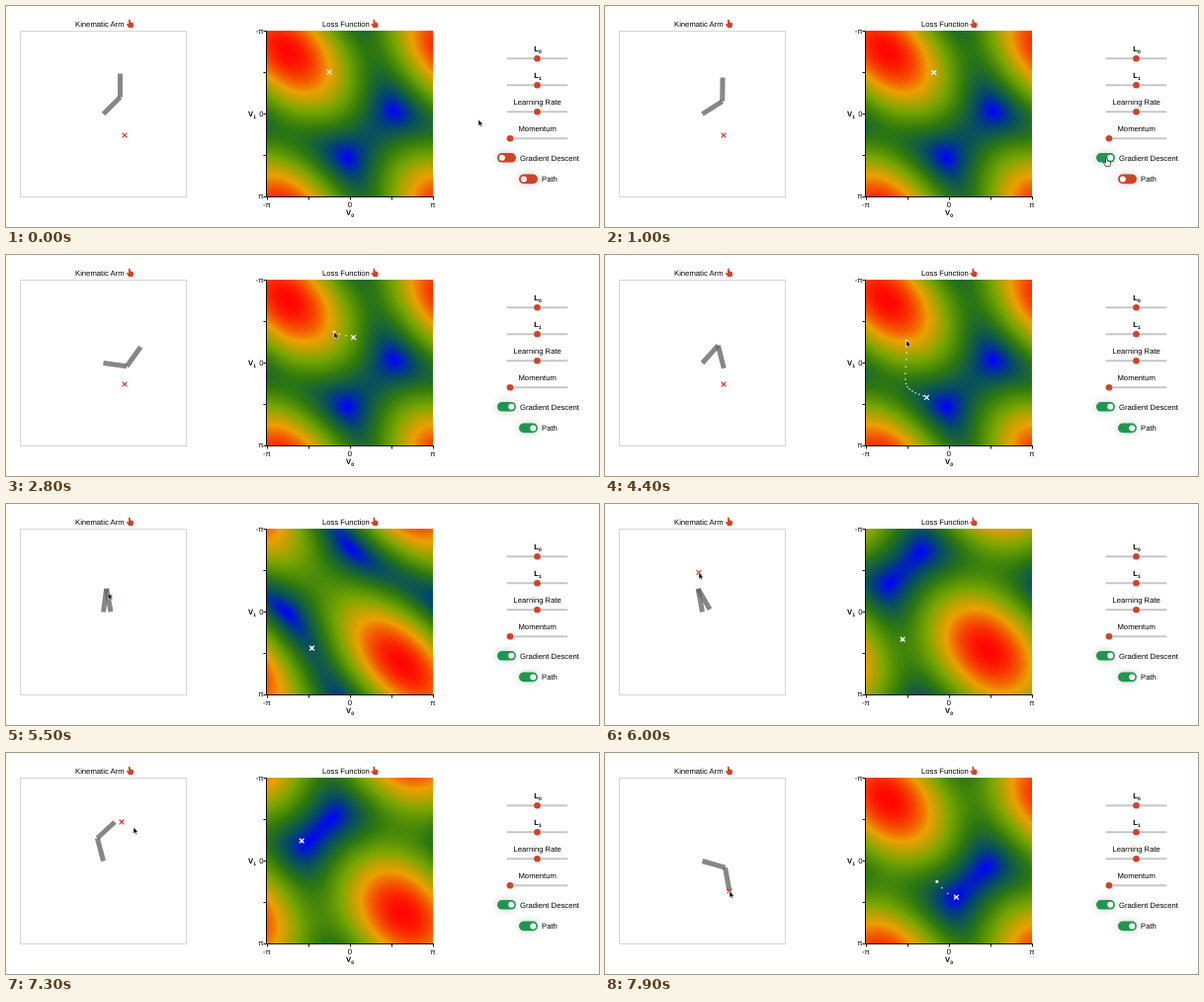
An HTML page with a canvas for the animation above (8000 ms loop, 600 px wide and 224 px high).

```html
<!DOCTYPE html>
<html lang="en">
<head>
<meta charset="utf-8">
<title>Kinematic Arm</title>
<style>
  html, body { margin: 0; width: 100%; height: 100%; overflow: hidden; background: #fff; }
  canvas { position: absolute; left: 264px; top: 25px; }
  svg { position: absolute; left: 0; top: 0; }
  text { font: 7.7px "Liberation Sans", Arial, sans-serif; text-rendering: geometricPrecision; }
  .b { font-weight: bold; }
  .mid { text-anchor: middle; }
  .end { text-anchor: end; }
  .pill { filter: drop-shadow(0 0 4px #0003); }
</style>
</head>
<body>
<canvas id="map" width="168" height="168"></canvas>
<svg width="600" height="224" viewBox="0 0 600 224">
  <defs>
    <path id="hand" d="M2.2 8.6 0 5.2Q-.4 4.2.8 4.3L2 5.2V.9Q2.2 0 2.9 0t.9.9V3Q4.7 2.5 5 3.3 5.9 2.9 6.1 3.7 7 3.5 7 4.5V6.3L6.2 8.6Z"/>
    <path id="x" d="M-2.4-2.4 2.4 2.4M2.4-2.4-2.4 2.4" fill="none" stroke-width="1.2"/>
  </defs>

  <text x="70" y="21">Kinematic Arm</text>
  <text x="320" y="21">Loss Function</text>
  <g fill="#cf4327">
    <use href="#hand" x="122" y="13.5"/>
    <use href="#hand" x="369.5" y="13.5"/>
  </g>
  <rect x="14.5" y="25.5" width="168" height="168" fill="none" stroke="#d6d6d6"/>

  <path id="axes" fill="none" stroke="#111"/>
  <g id="labels"></g>
  <text class="b mid" x="249" y="112">V<tspan font-size="5" dy="1.5">1</tspan></text>
  <text class="b mid" x="348" y="212">V<tspan font-size="5" dy="1.5">0</tspan></text>

  <g id="sliders"></g>
  <text class="b mid" x="538" y="46">L<tspan font-size="5" dy="1.5">0</tspan></text>
  <text class="b mid" x="538" y="73">L<tspan font-size="5" dy="1.5">1</tspan></text>
  <text class="mid" x="537.7" y="100">Learning Rate</text>
  <text class="mid" x="537.7" y="127">Momentum</text>
  <g id="descent" transform="translate(497 149)"></g>
  <g id="trace" transform="translate(519 170.6)"></g>
  <text x="520" y="157">Gradient Descent</text>
  <text x="542" y="178">Path</text>

  <path id="link0" stroke="#666" stroke-width="5" opacity=".78"/>
  <path id="link1" stroke="#666" stroke-width="5" opacity=".78"/>
  <use id="goal" href="#x" stroke="#e2301c"/>
  <g id="dots" fill="#fff"></g>
  <use id="mark" href="#x" stroke="#fff"/>
  <path id="arrow" d="M0 0V6.6L1.5 5.3 2.5 7.6 3.6 7.1 2.6 4.9H4.6Z" stroke="#fff" stroke-width=".5"/>
  <use id="pointer" href="#hand" fill="#fff" stroke="#222" stroke-width=".8"/>
</svg>
<script>
const $ = id => document.getElementById(id);
const { sin, cos, hypot, min, max, floor, PI } = Math;
const LOOP = 8000, FRAME = 100, SIZE = 168, LINK = 24, BASE = [98.5, 109.5], PLOT = [348, 109];
const DESCENT_ON = 940, PATH_ON = 1700;
const RATE = .0045, DOT_GAP = 60, LEAD = 80, MOVE = 350;

// The mark is put down twice, the goal is dragged twice along a curve.
const drops = [
  { time: 0, at: [327, 67] }, { time: 2610, at: [332, 78] }, { time: 3575, at: [305, 87] }
];
const drags = [
  { start: 4750, end: 6000, curve: [[120, 131], [107.5, 100], [95, 69.5]] },
  { start: 7200, end: 7700, curve: [[95, 69.5], [160, 62], [126, 140]] }
];
const stops = [
  { time: 0, at: [478, 115] }, { time: 900, at: [507, 154] }, { time: 1600, at: [528, 177] },
  { time: 2600, at: [332, 78] }, { time: 3560, at: [305, 86.5] }, { time: 4750, at: [120, 131] }
];
const ramp = [[0, 0, 255], [5, 75, 100], [45, 120, 15], [120, 165, 0], [235, 160, 0], [255, 5, 0]];

const clamp = u => min(1, max(0, u));
const smooth = u => u * u * (3 - 2 * u);
const mix = (a, b, u) => a.map((v, k) => v + (b[k] - v) * u);
const place = (el, [x, y]) => el.setAttribute("transform", `translate(${x} ${y})`);
const show = (el, on) => { el.style.display = on ? "" : "none"; };
const toAngles = p => p.map((v, k) => (v - PLOT[k]) / SIZE * 2 * PI);
const toPixels = a => a.map((v, k) => PLOT[k] + v * SIZE / 2 / PI);
const toReach = p => p.map((v, k) => (v - BASE[k]) / LINK);

function goalAt(t) {
  const { start, end, curve: [a, b, c] } = t < drags[1].start ? drags[0] : drags[1];
  const u = clamp((t - start) / (end - start));
  return mix(mix(a, b, u), mix(b, c, u), u);
}

function cursorAt(t) {
  if (t >= drags[0].start) return goalAt(t + (t < drags[1].start ? min(LEAD, max(0, drags[0].end - t)) : LEAD));
  return stops.reduce((p, s) => mix(p, s.at, smooth(clamp((t - s.time + MOVE) / MOVE))), stops[0].at);
}

// Descent on the distance between the arm's tip and the goal, one step per ms.
function descend(angles, goal) {
  const [gx, gy] = toReach(goal);
  const dx = cos(angles[0]) + cos(angles[1]) - gx, dy = sin(angles[0]) + sin(angles[1]) - gy;
  const size = max(hypot(dx, dy), .02);
  return angles.map(a => a - RATE * (dy * cos(a) - dx * sin(a)) / size);
}

const marks = [];
let angles;
for (let t = 0; t < LOOP; t++) {
  const drop = drops.find(d => d.time === t);
  if (drop) angles = toAngles(drop.at);
  else if (t > DESCENT_ON) angles = descend(angles, goalAt(t));
  marks.push(toPixels(angles));
}

const palette = Array.from({ length: 1001 }, (_, i) => {
  const s = i / 1000 * (ramp.length - 1), k = min(floor(s), ramp.length - 2);
  return mix(ramp[k], ramp[k + 1], s - k);
});
const ctx = $("map").getContext("2d");
const image = ctx.createImageData(SIZE, SIZE);
const grid = Array.from({ length: SIZE }, (_, i) => (i + .5) / SIZE * 2 * PI - PI);
const cosines = grid.map(cos), sines = grid.map(sin);
let drawnGoal = "";

function drawLoss(goal) {
  if (drawnGoal === String(goal)) return;
  drawnGoal = String(goal);
  const [gx, gy] = toReach(goal), scale = 1000 / (2 + hypot(gx, gy));
  for (let j = 0, p = 0; j < SIZE; j++) {
    for (let i = 0; i < SIZE; i++, p += 4) {
      const d = hypot(cosines[i] + cosines[j] - gx, sines[i] + sines[j] - gy);
      image.data.set([...palette[min(1000, floor(d * scale))], 255], p);
    }
  }
  ctx.putImageData(image, 0, 0);
}

function drawArm(mark) {
  let from = BASE;
  toAngles(mark).forEach((a, k) => {
    const to = [from[0] + LINK * cos(a), from[1] + LINK * sin(a)];
    $("link" + k).setAttribute("d", `M${from}L${to}`);
    from = to;
  });
}

function drawPath(t) {
  let start = DESCENT_ON;
  for (const d of drops) if (t >= d.time) start = max(start, d.time);
  for (const d of drags) if (t >= d.start) start = min(t, d.end);
  const dot = ([x, y], r) => `<circle cx="${x}" cy="${y}" r="${r}"/>`;
  let out = dot(marks[start], 1.5);
  for (let s = start + DOT_GAP; s < t; s += DOT_GAP) out += dot(marks[s], .75);
  $("dots").innerHTML = out;
}

function drawToggle(id, on) {
  $(id).innerHTML = `<rect class="pill" width="19" height="9.6" rx="4.8" fill="${on ? "#1f9650" : "#cf4327"}"/>
    <circle cx="${on ? 14.3 : 4.9}" cy="4.8" r="3" fill="#fff"/>`;
}

let axes = "M263.5 25V193.5H432";
for (let k = 0; k < 5; k++) axes += `M260.5 ${25.5 + 42 * k}h3M${264.5 + 42 * k} 193v3.5`;
$("axes").setAttribute("d", axes);
$("labels").innerHTML = ["-π", "0", "π"].map((s, k) =>
  `<text class="end" x="260.5" y="${28 + 83.5 * k}">${s}</text>
   <text class="mid" x="${264 + 84 * k}" y="204">${s}</text>`).join("");
$("sliders").innerHTML = [537.5, 537.5, 537.5, 510].map((x, k) => {
  const y = 53.3 + 27 * k;
  return `<rect x="506.5" y="${y - 1}" width="62" height="2" rx="1" fill="#c6c6c6"/>
    <circle cx="${x}" cy="${y}" r="3.3" fill="#cf4327"/>`;
}).join("");

const begin = performance.now();
let last = -1;
function frame() {
  const t = floor((performance.now() - begin) % LOOP / FRAME) * FRAME;
  if (t !== last) {
    last = t;
    const mark = marks[t], goal = goalAt(t), cursor = cursorAt(t);
    drawLoss(goal);
    drawArm(mark);
    drawPath(t);
    show($("dots"), t >= PATH_ON);
    drawToggle("descent", t >= DESCENT_ON);
    drawToggle("trace", t >= PATH_ON);
    place($("mark"), mark);
    place($("goal"), goal);
    const hover = cursor[0] > 496 && cursor[0] < 539 && cursor[1] > 148;
    show($("arrow"), !hover);
    show($("pointer"), hover);
    place($("arrow"), cursor);
    place($("pointer"), [cursor[0] - 2.5, cursor[1]]);
  }
  requestAnimationFrame(frame);
}
frame();
</script>
</body>
</html>
```
